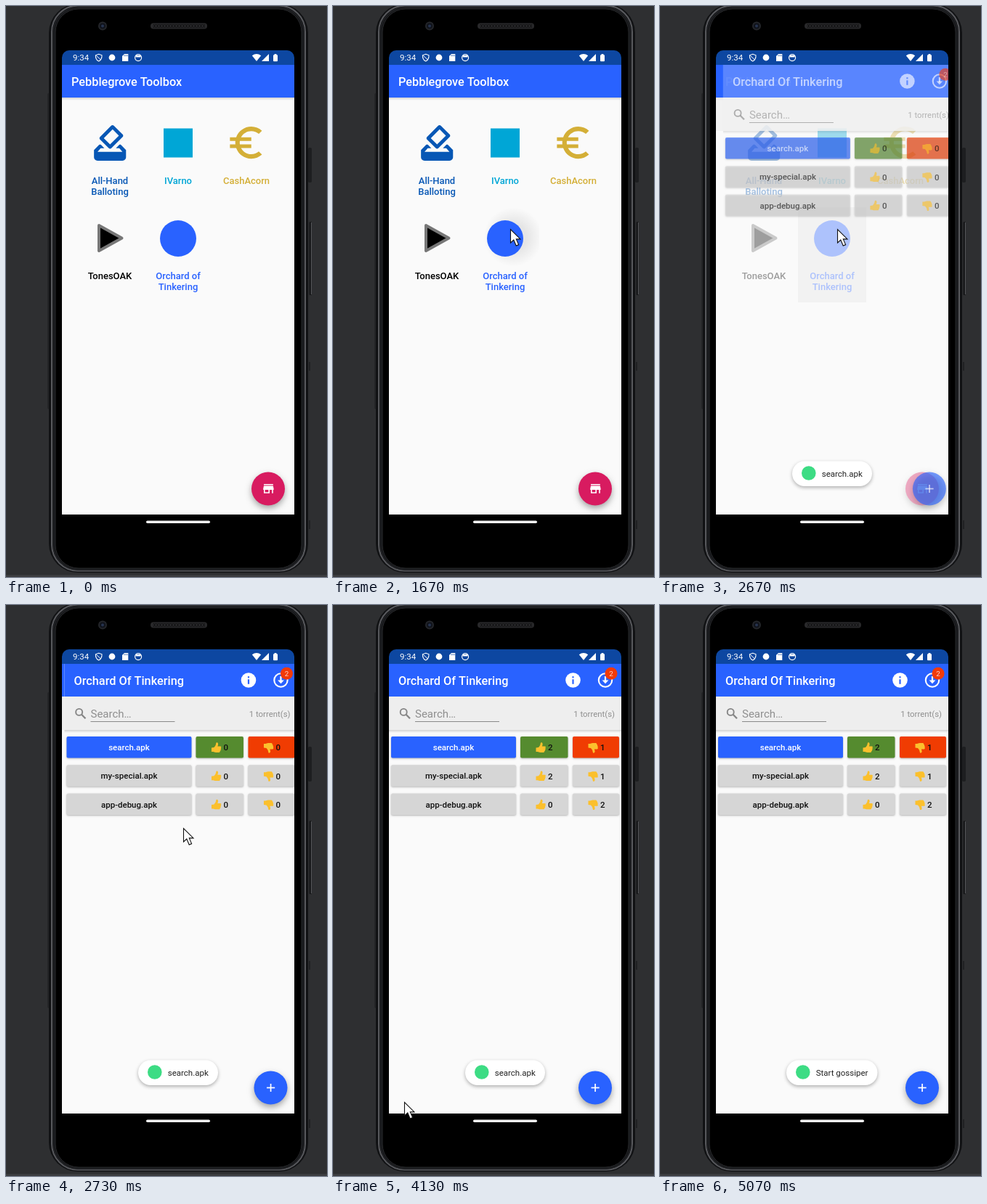
An HTML page with a canvas for the animation above (5.19 s loop, 442 px wide and 786 px high).

```html
<!DOCTYPE html>
<html lang="en">
<head>
<meta charset="utf-8">
<title>Phone app demo</title>
<style>
html, body { margin: 0; width: 100%; height: 100%; overflow: hidden; background: #2e2f31; }
canvas { display: block; width: 442px; height: 786px; }
</style>
</head>
<body>
<canvas id="stage" width="442" height="786"></canvas>
<script>
const ctx = document.getElementById('stage').getContext('2d');
const LOOP = 5190, STEP = 200 / 3;
const BLUE = '#2962ff', PAPER = '#fafafa';
const SCREEN = { x: 77, y: 61, w: 320, h: 639 };

const BALLOT = new Path2D('M18 13h-.68l-2 2h1.91L19 17H5l1.78-2h2.05l-2-2H6l-3 3v4c0 1.1.89 2 1.99 2H19c1.1 0 2-.89 2-2v-4l-3-3zm-1-5.05l-4.95 4.95-3.54-3.54 4.95-4.95L17 7.95zm-4.24-5.66L6.39 8.66c-.39.39-.39 1.02 0 1.41l4.95 4.95c.39.39 1.02.39 1.41 0l6.36-6.36c.39-.39.39-1.02 0-1.41L14.16 2.3c-.38-.4-1.01-.4-1.4-.01z');
const EURO = new Path2D('M15 18.5c-2.51 0-4.68-1.42-5.76-3.5H15v-2H8.58c-.05-.33-.08-.66-.08-1s.03-.67.08-1H15V9H9.24C10.32 6.92 12.5 5.5 15 5.5c1.61 0 3.09.59 4.23 1.57L21 5.3C19.41 3.87 17.3 3 15 3c-3.92 0-7.24 2.51-8.48 6H3v2h3.06c-.04.33-.06.66-.06 1s.02.67.06 1H3v2h3.52c1.24 3.49 4.56 6 8.48 6 2.31 0 4.41-.87 6-2.3l-1.78-1.77c-1.13.98-2.6 1.57-4.22 1.57z');
const STORE = new Path2D('M20 4H4v2h16V4zm1 10v-2l-1-5H4l-1 5v2h1v6h10v-6h4v6h2v-6h1zm-9 4H6v-4h6v4z');
const THUMB = new Path2D('M0.5 7.5L4 7C6 5 6.5 3.5 6.8 1.2C7 -0.2 9.6 0 9.6 2.4C9.6 3.8 9.1 4.8 8.9 5.6L12.5 5.6C14.2 5.7 14.2 7.6 13.2 7.9C14.1 8.5 13.9 9.9 12.9 10.1C13.5 10.8 13.2 12 12.2 12.1C12.4 13.2 11.8 13.9 10.8 13.9L6.5 13.9C4.8 13.9 4 13 2.8 13L0.5 13Z');
const ARROW = new Path2D('M.5 .5V19L4.8 15L8.2 23L11.6 21.6L8.3 13.9H14Z');

const clamp = v => Math.min(1, Math.max(0, v));
const ramp = (t, from, to) => clamp((t - from) / (to - from));

function box(x, y, w, h, r, fill) {
  ctx.beginPath();
  ctx.roundRect(x, y, w, h, r);
  ctx.fillStyle = fill;
  ctx.fill();
}

function disc(x, y, r, fill) {
  ctx.beginPath();
  ctx.arc(x, y, r, 0, 2 * Math.PI);
  ctx.fillStyle = fill;
  ctx.fill();
}

function line(color, width, ...pts) {
  ctx.beginPath();
  for (let i = 0; i < pts.length; i += 2) ctx.lineTo(pts[i], pts[i + 1]);
  ctx.strokeStyle = color;
  ctx.lineWidth = width;
  ctx.stroke();
}

function poly(fill, ...pts) {
  ctx.beginPath();
  for (let i = 0; i < pts.length; i += 2) ctx.lineTo(pts[i], pts[i + 1]);
  ctx.closePath();
  ctx.fillStyle = fill;
  ctx.fill();
}

function text(str, x, y, size, color, weight = 400, align = 'left') {
  ctx.font = `${weight} ${size}px Roboto, sans-serif`;
  ctx.textAlign = align;
  ctx.fillStyle = color;
  ctx.fillText(str, x, y);
}

function icon(path, x, y, scale, fill, flip = 1) {
  ctx.save();
  ctx.translate(x, y);
  ctx.scale(scale, scale * flip);
  ctx.fillStyle = fill;
  ctx.fill(path);
  ctx.restore();
}

function withShadow(blur, dy, alpha, draw) {
  ctx.save();
  ctx.shadowColor = `rgba(0,0,0,${alpha})`;
  ctx.shadowBlur = blur;
  ctx.shadowOffsetY = dy;
  draw();
  ctx.restore();
}

function edgeShadow(y) {
  const g = ctx.createLinearGradient(0, y, 0, y + 4);
  g.addColorStop(0, 'rgba(0,0,0,.16)');
  g.addColorStop(1, 'rgba(0,0,0,0)');
  ctx.fillStyle = g;
  ctx.fillRect(SCREEN.x, y, SCREEN.w, 4);
}

function outline(x, y, w, h, r, color, width) {
  ctx.beginPath();
  ctx.roundRect(x, y, w, h, r);
  ctx.strokeStyle = color;
  ctx.lineWidth = width;
  ctx.stroke();
}

function drawPhone() {
  ctx.fillStyle = '#2e2f31';
  ctx.fillRect(0, 0, 442, 786);
  ctx.fillStyle = '#3b3c3f';
  ctx.fillRect(0, 783, 442, 3);
  box(57, 120, 4, 435, 2, '#232426');
  box(416, 195, 5, 48, 2, '#1d1e20');
  box(417.5, 297, 3.5, 101, 1.5, '#17181a');
  line('#55565a', 1, 420.5, 298, 420.5, 397);
  for (const y of [490, 708]) line('#202123', 2, 418, y, 418, y + 12);

  box(59, -3, 357, 783, 40, '#111214');
  outline(63, -.5, 349, 778, 36, '#58595d', 2);
  outline(65.5, 2, 344, 774, 34, '#1f2023', 2);
  box(68, 4, 339, 770, 32, '#000');
  outline(68, 4, 339, 770, 32, '#2b2c2f', 1);

  disc(133, 27.5, 6, '#24262a');
  disc(133, 27.5, 4, '#10131b');
  disc(133, 27.5, 2, '#26334f');
  box(199, 23.5, 78, 8, 4, '#29292b');
  for (let x = 203; x < 274; x += 4) {
    line('#0e0e0f', 1, x, 25, x + 3, 30);
    line('#0e0e0f', 1, x + 3, 25, x, 30);
  }
  box(193, 708.5, 88, 3.5, 1.75, '#f4f4f4');
}

function drawStatusBar() {
  box(77, 61, 320, 20, [10, 10, 0, 0], '#0d47a1');
  text('9:34', 92, 75.3, 11.5, '#fff');

  ctx.beginPath();
  ctx.moveTo(127.7, 66.3);
  ctx.lineTo(132, 67.8);
  ctx.quadraticCurveTo(132.3, 74, 127.7, 76);
  ctx.quadraticCurveTo(123.1, 74, 123.4, 67.8);
  ctx.closePath();
  ctx.strokeStyle = '#fff';
  ctx.lineWidth = 1.1;
  ctx.stroke();
  line('#fff', 1, 124.5, 68.5, 130.5, 74);

  disc(146, 71, 4.4, '#fff');
  poly('#fff', 163, 66, 168.3, 66, 168.3, 76, 160, 76, 160, 69);
  for (const x of [163, 165, 167]) line('#0d47a1', .8, x, 67.3, x, 69.2);
  outline(177.6, 66.6, 9, 9, 4.5, '#fff', 1.2);
  box(178.5, 68, 7.2, 2.4, 1, '#fff');

  ctx.beginPath();
  ctx.moveTo(345, 76);
  ctx.lineTo(338.8, 68.3);
  ctx.quadraticCurveTo(345, 63.8, 351.2, 68.3);
  ctx.closePath();
  ctx.fillStyle = '#fff';
  ctx.fill();
  poly('#fff', 362, 66, 362, 76, 352, 76);
  box(368, 67.2, 6, 9, 1, '#fff');
  box(369.6, 66, 2.8, 2, 0, '#fff');
}

function drawAppBar(title) {
  ctx.fillStyle = PAPER;
  ctx.fillRect(77, 81, 320, 619);
  ctx.fillStyle = BLUE;
  ctx.fillRect(77, 81, 320, 45);
  text(title, 90, 110, 16.3, '#fff', 500);
}

function drawFab(color) {
  withShadow(9, 4, .35, () => disc(361, 664.5, 23, color));
}

function drawRipple(t) {
  if (t < 1660) return;
  const p = ramp(t, 1660, 1935);
  ctx.save();
  ctx.beginPath();
  ctx.rect(190, 277, 94, 131);
  ctx.clip();
  const r = 38 + 110 * p;
  const g = ctx.createRadialGradient(248, 318, 0, 248, 318, r);
  g.addColorStop(0, 'rgba(0,0,0,.084)');
  g.addColorStop(.45 + .54 * p, 'rgba(0,0,0,.084)');
  g.addColorStop(1, p < 1 ? 'rgba(0,0,0,0)' : 'rgba(0,0,0,.084)');
  ctx.fillStyle = g;
  ctx.fillRect(190, 277, 94, 131);
  ctx.restore();
}

function label(x, y, color, ...lines) {
  lines.forEach((s, i) => text(s, x, y + 15.5 * i, 13, color, 500, 'center'));
}

function drawHome(t) {
  drawAppBar('Pebblegrove Toolbox');
  edgeShadow(126);
  drawRipple(t);

  icon(BALLOT, 113.8, 159, 2.45, '#0757b5');
  label(143, 244.7, '#0757b5', 'All-Hand', 'Balloting');

  box(217, 168.5, 40, 40, 0, '#00a6d6');
  label(237, 244.7, '#00a6d6', 'IVarno');

  icon(EURO, 301, 158.7, 2.45, '#d4af37');
  label(331, 244.7, '#d4af37', 'CashAcorn');

  ctx.lineJoin = 'round';
  poly('#000', 128, 302, 159.5, 319.5, 128, 337);
  ctx.strokeStyle = '#777';
  ctx.lineWidth = 4;
  ctx.stroke();
  label(143, 375.7, '#000', 'TonesOAK');

  disc(237, 320, 25, BLUE);
  label(237, 375.7, BLUE, 'Orchard of', 'Tinkering');

  drawFab('#d81b60');
  icon(STORE, 351.8, 654.8, .8, '#fff');
}

function drawButton(x, y, w, color) {
  withShadow(2.5, 1, .28, () => box(x, y, w, 29.5, 2, color));
}

function drawVote(x, y, color, count, up) {
  drawButton(x, y, up ? 65.5 : 64, color);
  icon(THUMB, x + 21, up ? y + 8 : y + 23, 1, '#fbc02d', up ? 1 : -1);
  ctx.globalAlpha *= 1;
  text(count, x + 38, y + 19.3, 11.5, '#111', 500);
}

function drawList(t) {
  drawAppBar('Orchard Of Tinkering');
  disc(330.5, 103.5, 10.3, '#fff');
  box(329.4, 102.3, 2.2, 6.5, 0, BLUE);
  box(329.4, 98.2, 2.2, 2.2, 0, BLUE);

  outline(365.8, 94.3, 18.4, 18.4, 9.2, '#fff', 2.1);
  line('#fff', 2.2, 375, 98, 375, 105);
  poly('#fff', 370.6, 103.6, 379.4, 103.6, 375, 108.2);
  disc(383, 94.3, 8.5, '#f23a08');
  text('2', 383, 97.8, 9.8, '#fbd5cc', 400, 'center');

  ctx.fillStyle = '#eee';
  ctx.fillRect(77, 126, 320, 46);
  edgeShadow(172);
  outline(92.7, 142.9, 9, 9, 4.5, '#858585', 1.9);
  line('#858585', 2.3, 100.6, 150.8, 106, 156.2);
  text('Search…', 113, 154.8, 15, '#8f8f8f');
  line('#8a8a8a', 1, 113, 160.5, 229, 160.5);
  text('1 torrent(s)', 388, 153.8, 11.4, '#8f8f8f', 400, 'right');

  const counted = t > 2760;
  const rows = [['search.apk', 2, 1], ['my-special.apk', 2, 1], ['app-debug.apk', 0, 2]];
  rows.forEach(([name, ups, downs], i) => {
    const y = 181 + 39.2 * i, first = i === 0;
    drawButton(80, y, 172, first ? BLUE : '#d6d6d6');
    text(name, 166, y + 19.2, 11.5, first ? '#fff' : '#111', 500, 'center');
    drawVote(258, y, first ? '#558b2f' : '#d6d6d6', counted ? ups : 0, true);
    drawVote(330, y, first ? '#f03c02' : '#d6d6d6', counted ? downs : 0, false);
  });

  drawFab(BLUE);
  line('#fff', 1.7, 355.5, 664.5, 366.7, 664.5);
  line('#fff', 1.7, 361.1, 659, 361.1, 670);
}

// Two-part bezier: quick start, very long settle.
function settle(x) {
  const seg = x < 1 / 6 ? [[0, .05, .1333, 1 / 6], [0, 0, .06, .4]]
                        : [[1 / 6, .2083, .25, 1], [.4, .82, 1, 1]];
  const at = ([a, b, c, d], s) => {
    const r = 1 - s;
    return a * r ** 3 + 3 * b * s * r * r + 3 * c * s * s * r + d * s ** 3;
  };
  let lo = 0, hi = 1;
  for (let i = 0; i < 20; i++) {
    const mid = (lo + hi) / 2;
    if (at(seg[0], mid) < x) lo = mid; else hi = mid;
  }
  return at(seg[1], lo);
}

function drawScreen(t) {
  const p = settle(ramp(t, 2570, 3020));
  const alpha = ramp(t, 2610, 2700);
  ctx.save();
  ctx.beginPath();
  ctx.rect(SCREEN.x, SCREEN.y, SCREEN.w, SCREEN.h);
  ctx.clip();
  ctx.fillStyle = PAPER;
  ctx.fillRect(77, 81, 320, 619);
  if (alpha < 1) {
    drawHome(t);
  }
  if (alpha > 0) {
    const dx = 32 * (1 - p);
    ctx.globalAlpha = alpha;
    // Bars reach the screen edge while the page slides in.
    ctx.fillStyle = BLUE;
    ctx.fillRect(77, 81, 320, 45);
    ctx.fillStyle = '#eee';
    ctx.fillRect(77, 126, 320, 46);
    ctx.translate(dx, 0);
    drawList(t);
  }
  ctx.restore();
}

function drawToast(message, x, w, alpha) {
  if (alpha <= 0) return;
  ctx.save();
  ctx.globalAlpha = alpha;
  withShadow(5, 2, .3, () => box(x, 626.5, w, 34.5, 17.2, '#fff'));
  disc(x + 22.8, 643, 9.8, '#3ddc84');
  text(message, x + 40.7, 647.6, 11.5, '#222');
  ctx.restore();
}

// Pointer keys: time, x, y.
const POINTER = [
  [67, 432, 759], [133, 405, 692], [200, 366, 602], [267, 326, 502], [333, 290, 412],
  [400, 263, 337], [467, 249, 298], [533, 245, 284], [600, 244, 283], [867, 244, 283],
  [933, 244, 295], [1000, 244, 307], [3667, 244, 307], [3733, 252, 318], [3800, 276, 358],
  [3867, 293, 418], [3933, 294, 494], [4000, 262, 572], [4067, 180, 640], [4133, 98, 684],
  [4200, 45, 701], [4267, 34, 742], [4333, 40, 790]
];

function drawPointer(t) {
  const i = POINTER.findIndex(k => k[0] > t + 1);
  if (i < 1) return;
  const [t0, x0, y0] = POINTER[i - 1], [t1, x1, y1] = POINTER[i];
  const f = ramp(t, t0, t1);
  ctx.save();
  ctx.translate(Math.round(x0 + (x1 - x0) * f), Math.round(y0 + (y1 - y0) * f));
  ctx.fillStyle = '#fff';
  ctx.fill(ARROW);
  ctx.strokeStyle = '#111';
  ctx.lineWidth = 1.1;
  ctx.lineJoin = 'miter';
  ctx.stroke(ARROW);
  ctx.restore();
}

function render(now) {
  const t = Math.floor((now % LOOP + 4) / STEP) * STEP;
  drawPhone();
  drawScreen(t);
  drawStatusBar();
  drawToast('search.apk', 182, 110, ramp(t, 2150, 2490) * (1 - ramp(t, 4260, 4600)));
  drawToast('Start gossiper', 174, 125.5, ramp(t, 4740, 5065));
  drawPointer(t);
}

const start = performance.now();
function tick() {
  render(performance.now() - start);
  requestAnimationFrame(tick);
}
tick();
</script>
</body>
</html>
```
